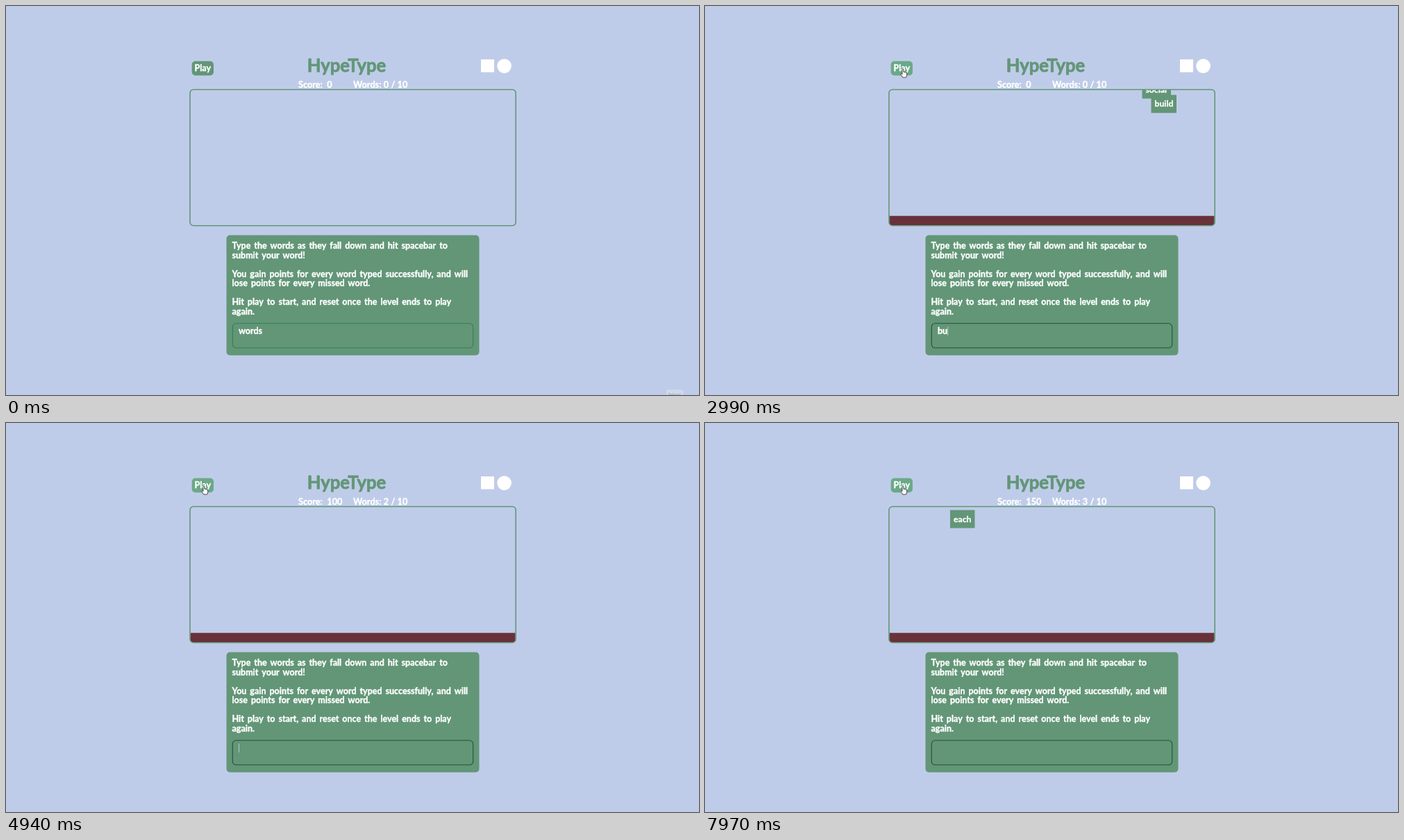
Animation, 998 px wide and 561 px high, one loop 8 s. Source, as an HTML page with a canvas:

```html
<!DOCTYPE html>
<html lang="en">
<head>
<meta charset="utf-8">
<title>HypeType</title>
<style>
html, body { margin: 0; width: 100%; height: 100%; overflow: hidden; background: #bfcce9; }
canvas { display: block; }
</style>
</head>
<body>
<canvas id="stage" width="998" height="561"></canvas>
<script>
const ctx = document.getElementById('stage').getContext('2d');
const LOOP = 8000, START = 1760, BLINK = 530;
const BG = '#bfcce9', GREEN = '#629677', HOVER = '#6aa988', RED = '#69313a';

const INTRO = [
  'Type the words as they fall down and hit spacebar to',
  'submit your word!',
  '',
  'You gain points for every word typed successfully, and will',
  'lose points for every missed word.',
  '',
  'Hit play to start, and reset once the level ends to play',
  'again.'
];

// top = box position at time "at"; keys = moment each letter is typed
const WORDS = [
  { text: 'build', x: 642.5, w: 36.5, top: 113.5, at: 2450, speed: .0273,
    keys: [2800, 2960, 3100, 3250, 3400], sent: 3680 },
  { text: 'social', x: 629.5, w: 41.5, top: 123.5, at: 3550, speed: .0287,
    keys: [4020, 4180, 4330, 4530, 4660, 4790], sent: 4940 },
  { text: 'laugh', x: 292, w: 40, top: 112.5, at: 6000, speed: .0294,
    keys: [6600, 6780, 6965, 7030, 7150], sent: 7320 },
  { text: 'each', x: 353, w: 35.5, top: 125.5, at: 7970, speed: .0276,
    keys: [], sent: Infinity }
];

// A hairline outline rounds and thickens the letters
function text(str, x, y, size = 12.5, color = '#fff', spacing = 1.9) {
  ctx.font = `700 ${size}px Lato, sans-serif`;
  ctx.wordSpacing = spacing + 'px';
  ctx.fillStyle = ctx.strokeStyle = color;
  ctx.lineJoin = 'round';
  ctx.lineWidth = size * .03;
  ctx.fillText(str, x, y);
  ctx.strokeText(str, x, y);
}

function rounded(x, y, w, h, r) {
  ctx.beginPath();
  ctx.roundRect(x, y, w, h, r);
}

function fillBox(x, y, w, h, r, color) {
  rounded(x, y, w, h, r);
  ctx.fillStyle = color;
  ctx.fill();
}

function strokeBox(x, y, w, h, r, color, width) {
  rounded(x, y, w, h, r);
  ctx.strokeStyle = color;
  ctx.lineWidth = width;
  ctx.stroke();
}

function header(t, hover) {
  fillBox(267.7, 79.5, 31.3, 20.8, 5, hover ? HOVER : GREEN);
  text('Play', 271.5, 94.3);
  text('HypeType', 433.7, 95.4, 25.7, GREEN, 0);
  fillBox(684, 77, 19, 18.5, 0, '#fff');
  fillBox(707.3, 76.3, 20.6, 20.6, 10.3, '#fff');
  const done = WORDS.filter(w => t >= w.sent).length;
  text('Score: ' + done * 50, 421, 117.7, 12.7, '#fff', 3.4);
  text(`Words: ${done} / 10`, 500, 117.7, 12.7, '#fff', .2);
}

function arena(t) {
  ctx.save();
  rounded(265.5, 121, 468, 195.5, 4);
  ctx.clip();
  if (t >= START) {
    ctx.fillStyle = RED;
    ctx.fillRect(265, 302.7, 470, 15);
    for (const word of WORDS) {
      const top = word.top + (t - word.at) * word.speed;
      if (t >= word.sent || top < 94) continue;
      ctx.fillStyle = GREEN;
      ctx.fillRect(word.x, top, word.w, 26);
      text(word.text, word.x + 5, top + 17.2, 12.2);
    }
  }
  ctx.restore();
  strokeBox(265, 120.5, 469.2, 196.2, 5, GREEN, 1.6);
}

function panel(t) {
  fillBox(317.5, 330.5, 364, 173.2, 5, GREEN);
  INTRO.forEach((line, i) => text(line, 325.5, 350.3 + i * 13.5));
  const focused = t >= START;
  strokeBox(326.3, 457.8, 346.4, 35.2, 5, focused ? '#24503c' : '#2e8157', 1.1);
  if (!focused) return text('words', 334.9, 473.4);

  const current = WORDS.find(w => t < w.sent);
  const count = current.keys.filter(k => t >= k).length;
  const typed = current.text.slice(0, count);
  text(typed, 334.9, 473.4);

  const events = [START, ...WORDS.flatMap(w => [...w.keys, w.sent])];
  const last = Math.max(...events.filter(e => e <= t));
  if ((t - last) % (2 * BLINK) < BLINK) {
    ctx.fillStyle = 'rgba(255,255,255,.65)';
    ctx.fillRect(335.2 + ctx.measureText(typed).width, 462.5, .8, 12.5);
  }
}

function pointerAt(t) {
  const rest = 1 - Math.min(1, (t - 330) / 1150);
  return [285 + 617 * rest ** 2.12, 91 + 450 * rest ** 1.46];
}

function pointer(x, y, hand) {
  const arrow = 'M0 0V9.6L2.2 7.6L3.7 11L5.2 10.3L3.8 7H6.8Z';
  const palm = 'M-1 .8Q0-.6 1 .8V4.2Q2 3.6 2.6 4.5Q3.7 4 4.2 5Q5.6 4.7 5.7 6V8.2' +
    'Q5.5 10 4.6 12H-.4Q-1.6 9.6-3.4 7.4Q-3.2 5.8-1 7.4Z';
  const shape = new Path2D(hand ? palm : arrow);
  ctx.save();
  ctx.translate(x, y);
  ctx.lineJoin = 'round';
  ctx.lineWidth = .8;
  ctx.fillStyle = '#fff';
  ctx.strokeStyle = '#222';
  ctx.fill(shape);
  ctx.stroke(shape);
  ctx.restore();
}

function draw(t) {
  ctx.fillStyle = BG;
  ctx.fillRect(0, 0, 998, 561);
  const [x, y] = pointerAt(t);
  const hover = t >= 330 && x < 299 && y < 100;
  header(t, hover);
  arena(t);
  panel(t);
  if (t < 70) {
    fillBox(951, 553.5, 24.5, 10, 1, '#d0d9ec');
    text('Reload', 953.5, 562, 6, '#a9b4cb', 0);
  }
  if (t >= 330) pointer(x, y, hover);
}

function loop() {
  draw(performance.now() % LOOP);
  requestAnimationFrame(loop);
}
loop();
</script>
</body>
</html>
```
